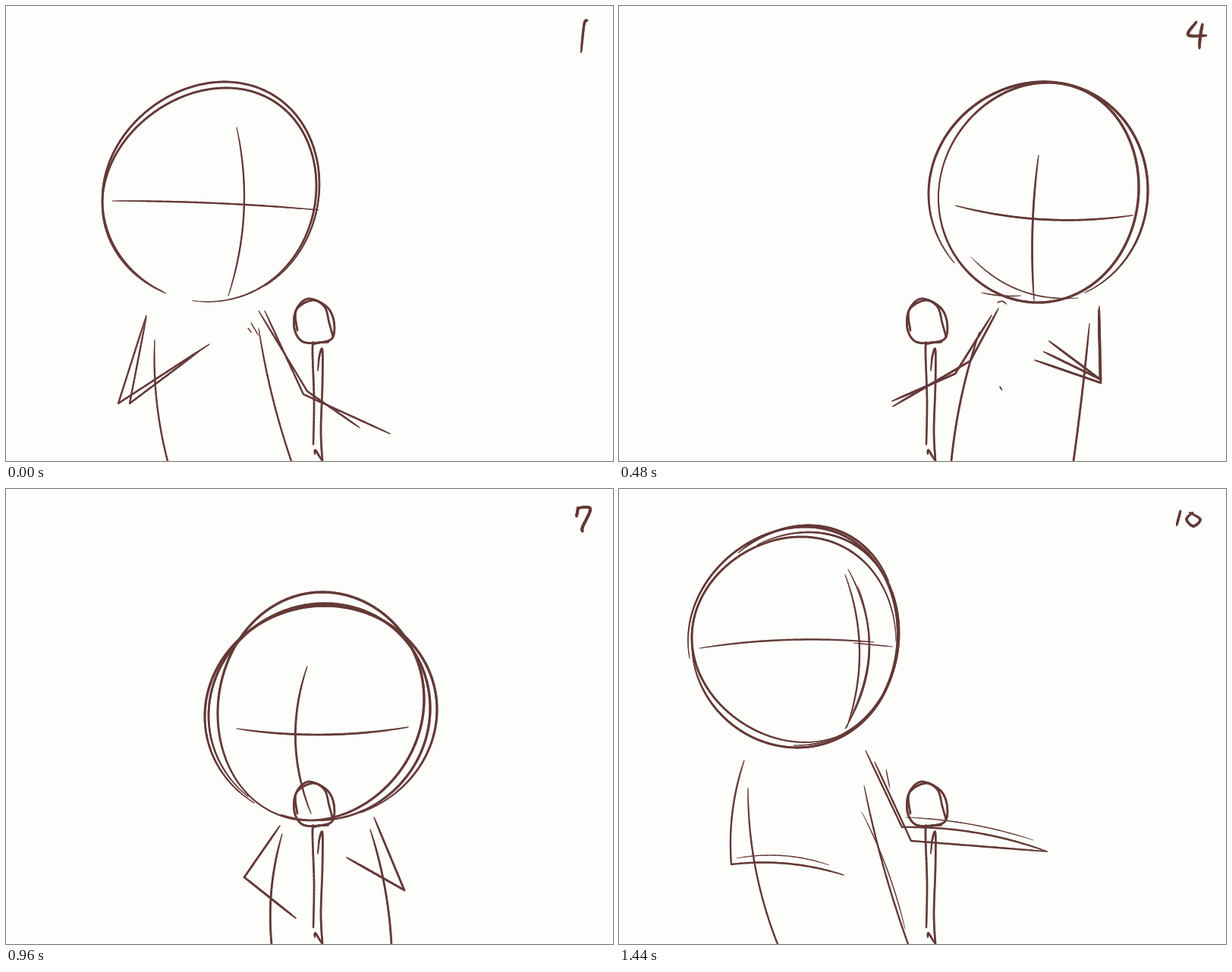
Write an HTML page with a canvas that moves like this. It is 800 px wide and 600 px high and loops after 1.76 s.

```html
<!DOCTYPE html>
<html lang="en">
<head>
<meta charset="utf-8">
<title>Rough pose loop</title>
<style>
html, body { margin: 0; width: 100%; height: 100%; overflow: hidden; background: #fdfdfc; }
canvas { display: block; }
</style>
</head>
<body>
<canvas id="stage" width="800" height="600"></canvas>
<script>
const ctx = document.getElementById('stage').getContext('2d');
const PAPER = '#fdfdfc', INK = '#643a37';
const STEP = 160, LOOP = 1760;
let weight = 1;

// Pens: width at the start, in the middle and at the end of a stroke.
const RING = [1.2, 3.3, 1.2], LINE = [1.1, 2.7, 1.3], SIDE = [1.1, 2.7, 2.7];
const UPPER = [1.2, 2.7, 2.7], FORE = [2.7, 2.9, 1.7], THIN = [.7, 1.7, .8];
const EVEN = [2.6, 2.7, 2.4], MARK = [2.6, 3.9, 2.4];

// Draws the path at(t), t from 0 to 1.
function stroke([start, mid, end], at, steps = 120) {
  let from = at(0);
  for (let i = 1; i <= steps; i++) {
    const t = i / steps, to = at(t);
    const edge = t < .5 ? start : end;
    ctx.lineWidth = weight * (mid + (edge - mid) * (1 - 2 * t) ** 4);
    ctx.beginPath();
    ctx.moveTo(...from);
    ctx.lineTo(...to);
    ctx.stroke();
    from = to;
  }
}

// A line that bulges by bow: right when drawn downwards, up when drawn rightwards.
function bend(pen, x0, y0, x1, y1, bow = 0) {
  const dx = x1 - x0, dy = y1 - y0, len = Math.hypot(dx, dy);
  stroke(pen, t => {
    const out = bow * 4 * t * (1 - t) / len;
    return [x0 + dx * t + dy * out, y0 + dy * t - dx * out];
  }, Math.ceil(len / 3) + 2);
}

// A lopsided ellipse in a box, touching it at topX and bottomX; degrees run clockwise from the right.
function loop(pen, left, top, right, bottom, topX, bottomX, from, to) {
  const cx = (left + right) / 2, cy = (top + bottom) / 2;
  const rx = (right - left) / 2, ry = (bottom - top) / 2;
  const topLean = Math.asin((topX - cx) / rx), bottomLean = Math.asin((cx - bottomX) / rx);
  stroke(pen, t => {
    const a = (from + (to - from) * t) * Math.PI / 180;
    const lean = topLean + (bottomLean - topLean) * (1 + Math.sin(a)) / 2;
    return [cx + rx * Math.cos(a), cy + ry * Math.sin(a - lean)];
  }, 300);
}

// A smooth curve through a few x,y pairs.
function curve(pen, ...p) {
  const n = p.length / 2 - 1;
  const near = (i, j) => p[Math.max(0, Math.min(n, i)) * 2 + j];
  stroke(pen, t => {
    const i = Math.min(n - 1, Math.floor(t * n)), u = t * n - i;
    return [0, 1].map(j => {
      const [a, b, c, d] = [-1, 0, 1, 2].map(k => near(i + k, j));
      return b + u / 2 * (c - a + u * (2 * a - 5 * b + 4 * c - d + u * (3 * (b - c) + d - a)));
    });
  }, n * 14);
}

function arm(shoulderX, shoulderY, elbowX, elbowY, handX, handY, upperBow, foreBow) {
  bend(UPPER, shoulderX, shoulderY, elbowX, elbowY, upperBow);
  bend(FORE, elbowX, elbowY, handX, handY, foreBow);
}

function mic() {
  weight = 1;
  curve(EVEN, 384,428, 382,402, 398,386, 422,396, 432,415, 430,438, 410,444, 390,442,
    380,425, 383,400, 404,388, 420,397, 426,418, 431,436);
  curve(EVEN, 425,443, 408,445, 404,451, 406,520, 405,578);
  curve(SIDE, 411,481, 413,462, 417,454, 417,500, 415,560, 417,600);
  curve(LINE, 407,591, 408,586, 416,599);
}

const leftHead = end => [
  [127, 108, 409, 390, 290, 266, 114, end],
  [127, 100, 413, 390, 288, 268, 116, 420]
];

const one = {
  digit: [[766,19, 762,24, 758,61]],
  ink: .85,
  heads: leftHead(459),
  cross: [[304,160, 293,382, 15], [140,257, 412,269, 3]],
  sides: [[196,440, 213,600, -6], [333,425, 376,600, -4]],
  arms: [[185,408, 148,524, 268,446], [341,402, 392,512, 506,564],
    [185,410, 163,524, 255,455], [333,402, 397,508, 466,556]],
  extra: [[319,425, 324,431], [323,418, 333,435]]
};

const three = {
  digit: [[751,23, 765,20, 772,25, 757,36, 773,38, 768,48, 752,53]],
  heads: [[277, 163, 541, 425, 440, 409, 115, 345], [264, 156, 567, 440, 425, 415, 100, 460],
    [269, 160, 548, 440, 430, 425, 100, 480]],
  cross: [[409,237, 410,434], [289,307, 545,322, -14]],
  sides: [[336,452, 322,600, -4], [488,454, 505,600, 5]],
  arms: [[332,438, 284,559, 370,484], [491,437, 533,512, 490,577], [494,447, 532,517, 487,574]]
};

const four = {
  digit: [[761,21, 750,38, 774,39], [769,24, 766,40, 765,56]],
  heads: [[408, 100, 697, 391, 560, 555, 140, 425], [421, 101, 685, 391, 565, 552, 180, 560]],
  cross: [[553,197, 547,388, -5], [443,263, 677,276, -12]],
  sides: [[475,430, 438,600, -5], [620,419, 599,600, 1]],
  arms: [[500,399, 463,468, 361,528], [633,396, 635,493, 567,442], [491,408, 443,485, 360,521],
    [632,400, 634,492, 560,456], [632,410, 635,497, 548,467]],
  extra: [[464,331, 605,385, -18], [478,378, 530,382, -2], [499,391, 511,394, 3], [502,502, 505,507]]
};

const five = {
  digit: [[754,26, 772,27], [760,27, 751,38, 765,45, 755,54, 744,51]],
  heads: [[473, 73, 726, 317, 605, 580, 95, 275], [473, 73, 726, 348, 605, 600, 230, 510],
    [472, 67, 739, 322, 620, 610, 270, 420], [470, 67, 739, 350, 620, 600, 90, 290],
    [461, 60, 747, 355, 619, 617, 110, 475]],
  cross: [[617,152, 610,341, 2], [486,218, 719,239, -11]],
  sides: [[531,363, 478,590, -13], [658,368, 646,591, 8]],
  arms: [[527,351, 475,430, 529,522], [670,370, 692,456, 757,340],
    [525,355, 484,435, 540,553], [664,376, 689,443, 745,355]]
};

const seven = {
  digit: [[752,36, 754,25], [753,25, 770,26, 760,50, 760,56]],
  heads: [[279, 136, 551, 437, 417, 400, 115, 500], [267, 151, 559, 437, 420, 410, 130, 470],
    [262, 154, 568, 437, 420, 410, 125, 430]],
  cross: [[397,234, 402,428, -18], [304,316, 530,314, -9]],
  sides: [[364,455, 350,600, -7], [480,449, 508,600, 5]],
  arms: [[361,444, 314,512, 382,566], [485,433, 525,529, 449,486]]
};

const nine = {
  digit: [[766,30, 758,21, 744,29, 752,36, 766,31, 757,45, 751,62]],
  heads: leftHead(500),
  cross: [[288,172, 279,377, 19], [149,270, 392,280, 2]],
  sides: [[205,415, 222,600, -11], [326,409, 358,596]],
  arms: [[202,388, 173,452, 228,532], [316,393, 340,452, 406,410]]
};

const ten = {
  digit: [[740,29, 735,48], [756,31, 748,40, 757,49, 766,40, 752,31]],
  ink: .85,
  heads: [[91, 50, 367, 340, 245, 235, 170, 390], [91, 57, 369, 338, 250, 235, 250, 450],
    [96, 63, 365, 334, 240, 245, 65, 360], [96, 60, 367, 341, 240, 235, 0, 180],
    [100, 48, 368, 340, 250, 235, 235, 335]],
  cross: [[298,113, 300,315, 18], [106,210, 336,202, 7], [302,106, 298,316, 30]],
  sides: [[170,394, 209,600, -10], [323,391, 381,600, -4]],
  arms: [[165,358, 148,495, 296,509, -7, 8], [325,345, 373,446, 564,478, 0, 9],
    [337,360, 385,464, 564,478]],
  extra: [[315,128, 303,304, 20], [309,203, 361,208], [155,487, 277,496, 8],
    [378,433, 546,463, 6], [320,426, 377,580, 5], [352,370, 357,395]]
};

const mix = (a, b, u) => a.map((v, i) => Array.isArray(v) ? mix(v, b[i], u) : v + ((b[i] ?? 0) - v) * u);

// A pose between two others, with a moved copy of a third one's head.
const between = (a, b, u, headOf, shift, digit) => ({
  digit, shift,
  heads: headOf.heads,
  cross: mix(a.cross, b.cross, u),
  sides: mix(a.sides, b.sides, u),
  arms: mix(a.arms.slice(0, 2), b.arms, u)
});

const two = between(one, three, .43, nine, [60, 26], [[752,26, 762,20, 769,27, 752,52, 780,50]]);
const six = between(five, seven, .3, four, [-6, -9], [[766,24, 751,46, 760,54, 769,47, 753,46]]);
const eight = between(seven, nine, .57, nine, [58, 24],
  [[764,28, 750,28, 764,43, 758,53, 750,49, 768,26]]);

const poses = [one, two, three, four, five, six, seven, eight, nine, ten];

function draw({ heads, shift = [0, 0], cross, sides, arms, extra = [], digit, ink = 1 }) {
  ctx.fillRect(0, 0, 800, 600);
  weight = ink;
  ctx.save();
  ctx.translate(...shift);
  for (const h of heads) loop(RING, ...h);
  ctx.restore();
  for (const c of cross) bend(LINE, ...c);
  for (const s of sides) bend(SIDE, ...s);
  for (const a of arms) arm(...a);
  for (const e of extra) bend(THIN, ...e);
  for (const d of digit) curve(MARK, ...d);
  mic();
}

ctx.lineCap = 'round';
ctx.strokeStyle = INK;
ctx.fillStyle = PAPER;

const began = performance.now();
let shown;

function tick() {
  const time = (performance.now() - began) % LOOP;
  const pose = poses[Math.min(poses.length - 1, Math.floor(time / STEP))];
  if (pose !== shown) draw(shown = pose);
  requestAnimationFrame(tick);
}
tick();
</script>
</body>
</html>
```
